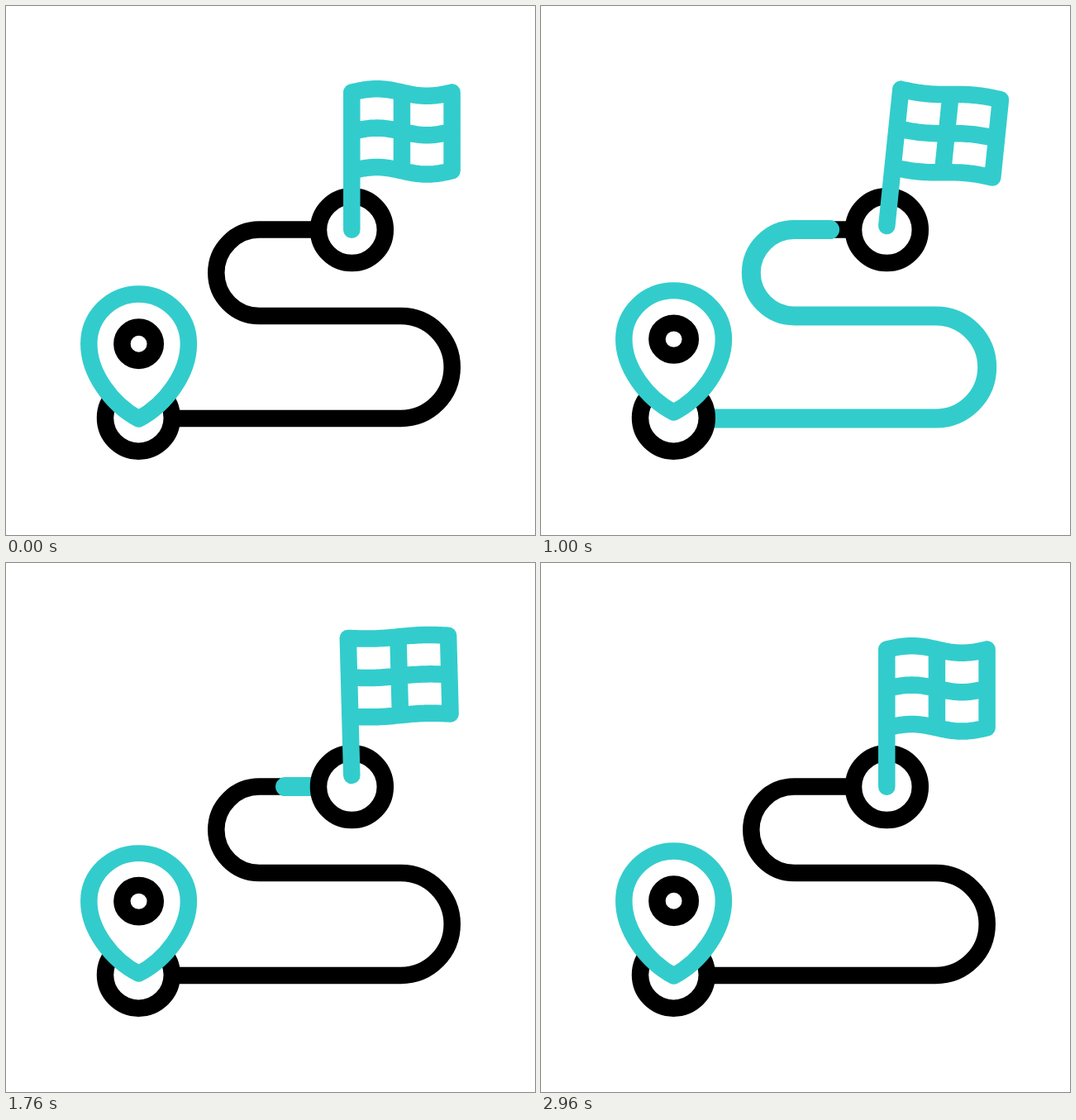
An HTML page with a canvas for the animation above (3 s loop, 640 by 640 pixels).

```html
<!DOCTYPE html>
<html lang="en">
<head>
<meta charset="utf-8">
<title>Route</title>
<style>
html, body { margin: 0; width: 100%; height: 100%; overflow: hidden; background: #fff; }
canvas { display: block; width: 100vmin; height: 100vmin; }
</style>
</head>
<body>
<canvas id="stage" width="640" height="640"></canvas>
<script>
const ctx = document.getElementById('stage').getContext('2d');
const TEAL = '#33cccc', BLACK = '#000', LINE = 20.5;
const LOOP = 3000, STEP = 40, REST = 2800;

const clamp = u => Math.max(0, Math.min(1, u));
const smooth = u => u * u * (3 - 2 * u);
const settle = u => u + u * u - u * u * u;

// Height of a bounce whose hops last equally long and shrink by a factor
function bounce(t, start, len, height, decay, count) {
  const n = Math.floor((t - start) / len);
  if (n < 0 || n >= count) return 0;
  const u = (t - start) / len - n;
  return height * decay ** n * 4 * u * (1 - u);
}

// Degrees of lean, eased between the turning points of the swing
const swing = [[0, 0], [600, -10], [1160, 9.8], [1600, -3.5], [2080, 4], [2480, 0]];
function tilt(t) {
  const i = swing.findIndex(([time]) => time > t);
  if (i < 0) return 0;
  const [a, from] = swing[i - 1], [b, to] = swing[i];
  return from + (to - from) * smooth((t - a) / (b - a));
}

// Cloth amplitude: two full swings, lingering a little on the far side
function ripple(t) {
  const c = Math.cos(Math.min(t, REST) / REST * Math.PI * 4);
  return 1.2 * (1 - c * c) - 4.3 * c;
}

const route = new Path2D();
route.moveTo(201, 499);
route.lineTo(477.7, 499);
route.arc(477.7, 437, 62, Math.PI / 2, -Math.PI / 2, true);
route.lineTo(306.5, 375);
route.arc(306.5, 322.8, 52.2, Math.PI / 2, Math.PI * 1.5);
route.lineTo(378, 270.6);
const ROUTE_LEN = 276.7 + 171.2 + 71.5 + Math.PI * (62 + 52.2);

const drop = new Path2D();
drop.moveTo(160.6, 499.5);
drop.bezierCurveTo(127.5, 482, 100.3, 444, 100.3, 408.7);
drop.arc(160.6, 408.7, 60.3, Math.PI, 0);
drop.bezierCurveTo(220.9, 444, 193.7, 482, 160.6, 499.5);
drop.closePath();

function ring(x, y, r) {
  ctx.beginPath();
  ctx.arc(x, y, r, 0, Math.PI * 2);
  ctx.fillStyle = '#fff';
  ctx.fill();
  ctx.strokeStyle = BLACK;
  ctx.lineWidth = LINE;
  ctx.stroke();
}

function drawRoute(t) {
  ctx.lineWidth = LINE;
  ctx.strokeStyle = BLACK;
  ctx.stroke(route);
  const head = settle(clamp((t - 60) / 1084)) * ROUTE_LEN;
  const tail = settle(clamp((t - 1000) / 904)) * ROUTE_LEN;
  if (head - tail < 0.5) return;
  ctx.save();
  ctx.lineWidth = 23;
  ctx.strokeStyle = TEAL;
  ctx.setLineDash([head - tail, ROUTE_LEN * 2]);
  ctx.lineDashOffset = -tail;
  ctx.stroke(route);
  ctx.restore();
}

function drawFlag(t) {
  const wave = ripple(t), w = 121.3, top = -166.2, gap = 47.4, parts = 40;
  ctx.save();
  ctx.translate(418.3, 270.7 - bounce(t, 988, 665, 64.7, 0.39, 2));
  ctx.rotate(tilt(t) * Math.PI / 180);
  ctx.strokeStyle = TEAL;
  ctx.lineWidth = LINE;
  ctx.beginPath();
  ctx.moveTo(0, 0);
  ctx.lineTo(0, top);
  for (const x of [w / 2, w]) {
    ctx.moveTo(x, top);
    ctx.lineTo(x, top + gap * 2);
  }
  for (let row = 0; row < 3; row++) {
    const y = top + gap * row;
    ctx.moveTo(0, y);
    for (let i = 1; i <= parts; i++) {
      ctx.lineTo(w * i / parts, y + wave * Math.sin(Math.PI * 2 * i / parts));
    }
  }
  ctx.stroke();
  ctx.restore();
}

function drawPin(t) {
  const mid = 424, hop = 880;
  // Squashed near each landing, but not at the first take-off or last one
  const landing = t > hop / 2 && t < hop * 2.5 ? Math.abs(2 * (t / hop % 1) - 1) : 0;
  ctx.save();
  ctx.translate(0, mid - bounce(t, 0, hop, 24, 0.53, 3));
  ctx.scale(1, 1 - 0.035 * landing);
  ctx.translate(0, -mid);
  ctx.fillStyle = '#fff';
  ctx.fill(drop);
  ctx.strokeStyle = TEAL;
  ctx.lineWidth = LINE;
  ctx.stroke(drop);
  ring(160.6, 408.7, 20.2);
  ctx.restore();
}

function draw(t) {
  ctx.fillStyle = '#fff';
  ctx.fillRect(0, 0, 640, 640);
  ctx.lineCap = ctx.lineJoin = 'round';
  drawRoute(t);
  ring(160.4, 498.3, 40.4);
  ring(418.4, 270.7, 40.4);
  drawFlag(t);
  drawPin(t);
}

const start = performance.now();
function tick(now) {
  const t = Math.max(0, now - start) % LOOP;
  draw(Math.floor(t / STEP) * STEP);
  requestAnimationFrame(tick);
}
draw(0);
requestAnimationFrame(tick);
</script>
</body>
</html>
```
